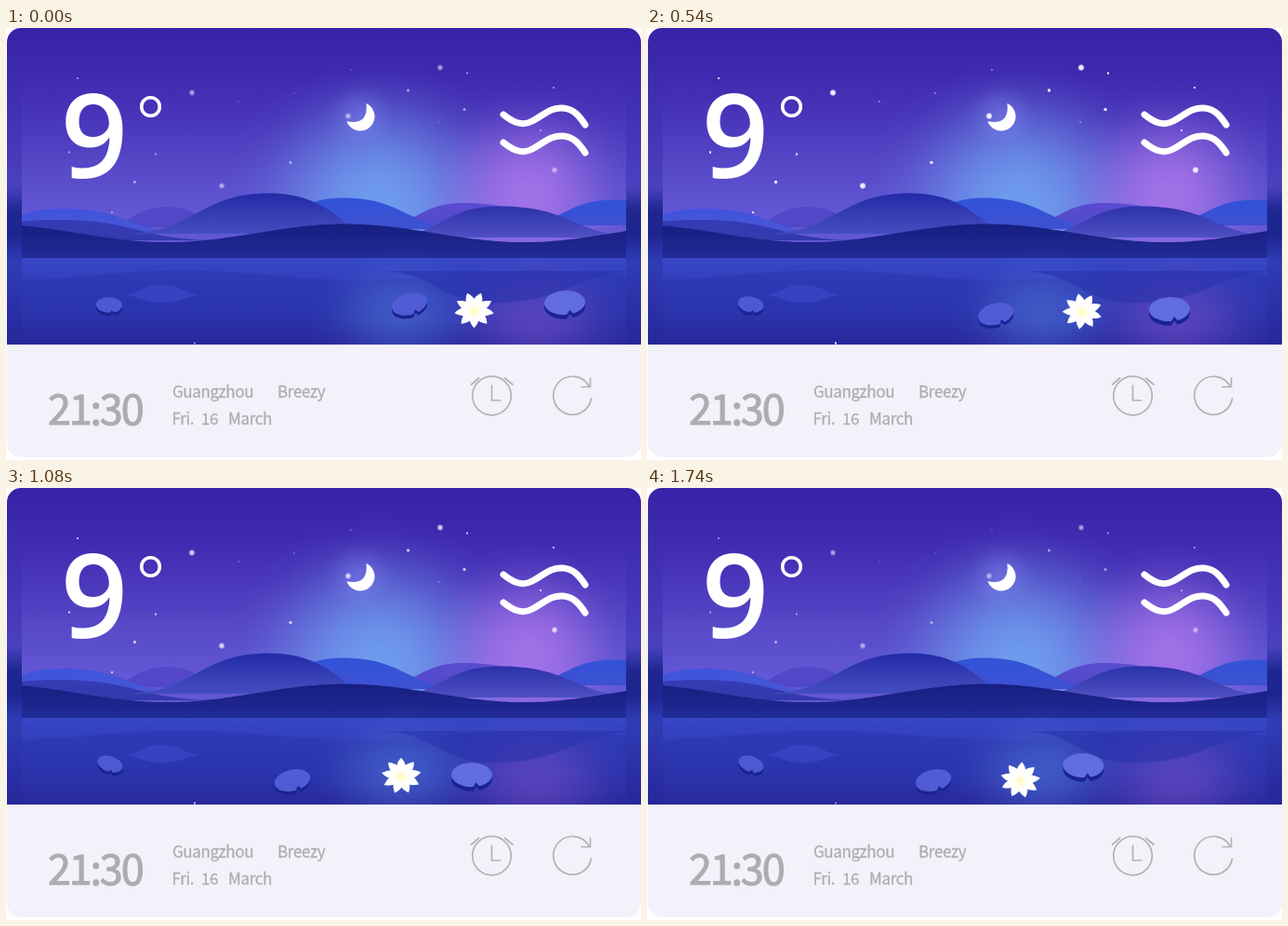
Write an HTML page with a canvas that moves like this. It is 683 by 464 pixels and loops after 1800 ms.

```html
<!DOCTYPE html>
<html lang="en">
<head>
<meta charset="utf-8">
<title>Night weather</title>
<style>
html, body { margin: 0; width: 100%; height: 100%; overflow: hidden; background: #fff; }
canvas, svg { position: absolute; left: 0; top: 0; width: 683px; height: 464px; display: block; }
.info { font-family: "Noto Sans CJK SC", "Noto Sans", sans-serif; fill: #adadb0; stroke: #adadb0; }
.small { font-size: 17px; letter-spacing: -.35px; stroke-width: .3; }
.time { font-size: 45px; letter-spacing: -2.2px; stroke-width: 1.1; }
.temp { font-family: "Open Sans", "Noto Sans", sans-serif; font-size: 126px; font-weight: 600; fill: #fff; }
.line { fill: none; stroke: #b3b3b5; stroke-width: 1.7; stroke-linecap: round; }
.white { fill: none; stroke: #fff; stroke-linecap: round; }
</style>
</head>
<body>
<canvas id="stage" width="683" height="464"></canvas>
<svg viewBox="0 0 683 464">
  <text class="temp" x="59" y="161">9</text>
  <circle class="white" cx="155.5" cy="84.5" r="9.8" stroke-width="3.6"/>
  <g class="white" stroke-width="7">
    <path id="breeze" d="M535 93C545 101 555 106 566 100C579 93 586 85 599 86C611 87 617 95 623 104"/>
    <use href="#breeze" y="30"/>
  </g>
  <g class="info">
    <text class="time" x="45" y="426">21:30</text>
    <g class="small">
      <text x="179" y="397">Guangzhou</text>
      <text x="292" y="397">Breezy</text>
      <text x="178.5" y="426">Fri.</text>
      <text x="210" y="426">16</text>
      <text x="239" y="426">March</text>
    </g>
  </g>
  <g class="line">
    <circle cx="522.5" cy="395" r="20.8"/>
    <path d="M522.5 384V400H531.5M500.500 383L508.500 376M536.500 376L545 383"/>
    <path d="M629.500 398A20.500 20.500 0 1 1 627 384.500M628.500 376V385.500H619"/>
  </g>
</svg>
<script>
const W = 683, H = 464, LOOP = 1800, SHORE = 247, FLOOR = 340;
const ctx = document.getElementById('stage').getContext('2d');
const rad = deg => deg * Math.PI / 180;
const mix = (a, b, k) => a + (b - a) * k;

function fade(c, y0, y1, ...colors) {
  const g = c.createLinearGradient(0, y0, 0, y1);
  colors.forEach((color, i) => g.addColorStop(i / (colors.length - 1), color));
  return g;
}

function glow(c, x, y, r, rgb, alpha, flat = 1) {
  c.save();
  c.translate(x, y);
  c.scale(1, flat);
  const g = c.createRadialGradient(0, 0, 0, 0, 0, r);
  for (let k = 0; k <= 1; k += .125) {
    g.addColorStop(k, `rgba(${rgb},${alpha * (1 + Math.cos(k * Math.PI)) / 2})`);
  }
  c.fillStyle = g;
  c.fillRect(-r, -r, 2 * r, 2 * r);
  c.restore();
}

// A hump over a flat foot; drop 0 ends in a soft tail, higher values make a steeper right side.
function hump(c, left, peakX, right, foot, peakY, fill, drop = 0) {
  const a = (peakX - left) / 2, b = (right - peakX) / 2;
  c.beginPath();
  c.moveTo(left, foot);
  c.bezierCurveTo(left + a, foot, peakX - a, peakY, peakX, peakY);
  c.bezierCurveTo(peakX + b, peakY, right - b * (1 - drop), mix(foot, peakY, drop), right, foot);
  c.fillStyle = fill;
  c.fill();
}

// Everything below a cosine wave.
function wave(c, mid, height, crest, half, bottom, fill) {
  c.beginPath();
  c.moveTo(0, bottom);
  for (let x = 0; x <= W; x += 4) c.lineTo(x, mid - height * Math.cos((x - crest) / half * Math.PI));
  c.lineTo(W, bottom);
  c.fillStyle = fill;
  c.fill();
}

function drawSky(c) {
  c.fillStyle = fade(c, 0, 200, '#3822a7', '#3f29af', '#4a37bb', '#5749c8', '#6257d4');
  c.fillRect(0, 0, W, SHORE);
  glow(c, 400, 192, 165, '112,162,240', .92);
  glow(c, 562, 178, 120, '176,120,236', .82);
  glow(c, 381, 95, 42, '150,150,255', .3);
}

function drawHills(c) {
  const shade = (top, a, b) => fade(c, top, 225, a, b);
  hump(c, 100, 172, 250, 214, 192, shade(192, '#5447ca', '#4e48c6'));
  hump(c, -60, 62, 200, 220, 194, shade(194, '#3d53dc', '#4d58d4'));
  hump(c, 390, 492, 640, 216, 188, shade(188, '#5a4bd0', '#4c4cc8'));
  hump(c, 250, 362, 500, 216, 182.5, shade(182, '#3153d9', '#4250d0'));
  hump(c, 545, 655, 790, 212, 184.5, shade(184, '#3152d8', '#4550cf'));
  hump(c, -120, 55, 230, 228, 206, shade(206, '#343cb6', '#3339ad'));
  hump(c, 125, 284, 378, 221, 177.5, shade(177, '#222ba6', '#4851c2'), .5);
  hump(c, 405, 532, 690, 225, 191.5, shade(191, '#2a32aa', '#4f50c2'));
  wave(c, 220.3, 9.8, 365, 192, SHORE, fade(c, 210, SHORE, '#171e80', '#212b96'));
}

function drawLake(c) {
  c.fillStyle = fade(c, SHORE, FLOOR, '#3747c7', '#303cb8', '#2b34ae', '#29289a');
  c.fillRect(0, SHORE, W, FLOOR - SHORE);
  wave(c, 265.5, 5, 190, 190, FLOOR, fade(c, 260, FLOOR, 'rgba(34,40,158,.3)', 'rgba(34,40,158,0)'));
  hump(c, 122, 168, 214, 287, 276, 'rgba(64,78,212,.5)');
  hump(c, 122, 168, 214, 287, 295, 'rgba(64,78,212,.5)');
  glow(c, 425, 306, 105, '82,122,218', .52, .7);
  glow(c, 570, 312, 112, '130,84,206', .5, .7);
  hump(c, 400, 525, 690, 261, 295, 'rgba(43,50,172,.6)');
}

function drawMoon(c) {
  c.fillStyle = '#fff';
  c.beginPath();
  c.arc(381, 95, 15.5, rad(-65), rad(160));
  c.quadraticCurveTo(390, 105, 387.5, 81);
  c.fill();
}

function buildBackground() {
  const cv = document.createElement('canvas'), c = cv.getContext('2d');
  cv.width = W;
  cv.height = H;
  c.fillStyle = '#fff';
  c.fillRect(0, 0, W, H);
  c.beginPath();
  c.roundRect(1, 0, 682, 461, 15);
  c.clip();
  // Blurred margins behind the scene.
  c.fillStyle = fade(c, 0, 170, '#3822a7', '#4230b2', '#4a41c0');
  c.fillRect(0, 0, W, 170);
  c.fillStyle = fade(c, 170, 250, '#4a41c0', '#1e2790', '#1d2690', '#303cb6');
  c.fillRect(0, 170, W, 80);
  c.fillStyle = fade(c, 250, FLOOR, '#303cb6', '#27279a');
  c.fillRect(0, 250, W, 90);
  c.save();
  c.beginPath();
  c.rect(17, 0, 650, FLOOR);
  c.clip();
  [drawSky, drawHills, drawLake, drawMoon].forEach(paint => paint(c));
  c.restore();
  c.fillStyle = '#f3f2fb';
  c.fillRect(0, FLOOR, W, 121);
  return cv;
}

// Star places by radius.
const stars = {
  3: [[200, 69.5], [467, 42.5], [590, 152.5], [232, 169.5], [368, 94.5]],
  1.7: [[432.5, 67], [306, 144.5], [138.5, 165.5], [493, 87.5]],
  1.2: [[77, 54], [496, 48.5], [589, 64], [575, 110], [161, 135.5], [68, 133.5], [114, 198], [203, 338.5]],
  .7: [[371, 45], [310, 70], [250, 79], [466, 101]]
};

// Short flashes every 480 ms after a calm start.
function twinkle(t) {
  const away = Math.abs((t + 180) % 480 - 240);
  return t < 300 ? 0 : Math.max(0, 1 - away / 130);
}

function drawStars(t) {
  const shine = twinkle(t), a = mix(.64, 1, shine);
  for (const size in stars) {
    const r = size * 1.25;
    for (const [x, y] of stars[size]) {
      const g = ctx.createRadialGradient(x, y, 0, x, y, r);
      g.addColorStop(0, `rgba(255,255,255,${a})`);
      g.addColorStop(mix(.4, .65, shine), `rgba(240,236,255,${a * .85})`);
      g.addColorStop(1, 'rgba(230,225,255,0)');
      ctx.fillStyle = g;
      ctx.fillRect(x - r, y - r, 2 * r, 2 * r);
    }
  }
}

// x, y and turn at both ends; ease shapes the speed, arc bends the path.
const drifts = {
  small: { from: [111, 297.5, 2], to: [112, 296.5, 19], end: 1080, ease: 1, arc: 1 },
  middle: { from: [434, 296.5, -15], to: [308, 314, -13], end: 1080, ease: 1.1, arc: .65 },
  large: { from: [601, 295, -3], to: [444.5, 312.5, 2], end: 1500, ease: 1.36, arc: .65, back: [31, -18] },
  flower: { from: [503.5, 303, 0], to: [401.5, 313.5, 25], end: 1360, ease: 1.15, arc: 2 }
};

function place({ from, to, end, ease, arc, back = [0, 0] }, t) {
  const p = Math.min(1, t / end) ** ease;
  const q = Math.max(0, t - end) / (LOOP - end);
  return [
    mix(from[0], to[0], p) + back[0] * q,
    mix(from[1], to[1], p ** arc) + back[1] * q,
    rad(mix(from[2], to[2], p))
  ];
}

function leaf(x, y, turn, rx, ry, color) {
  ctx.save();
  ctx.translate(x, y);
  ctx.rotate(turn);
  ctx.scale(rx, ry);
  ctx.beginPath();
  ctx.arc(0, 0, 1, rad(86), rad(428));
  ctx.lineTo(.22, .62);
  ctx.lineTo(.16, .78);
  ctx.closePath();
  ctx.restore();
  ctx.fillStyle = color;
  ctx.fill();
}

function pad(drift, t, rx, ry, drop, color) {
  const [x, y, turn] = place(drift, t);
  leaf(x, y + drop, turn, rx, ry, '#1a238f');
  leaf(x, y, turn, rx, ry, color);
}

function flower(t) {
  const [x, y, turn] = place(drifts.flower, t), petals = 9;
  ctx.save();
  ctx.translate(x, y);
  ctx.scale(1, .9);
  ctx.rotate(turn + rad(10));
  ctx.fillStyle = '#fff';
  for (let i = 0; i < petals; i++) {
    ctx.beginPath();
    ctx.moveTo(0, 0);
    ctx.bezierCurveTo(5, -7, 14, -6.5, 21.5, 0);
    ctx.bezierCurveTo(14, 6.5, 5, 7, 0, 0);
    ctx.fill();
    ctx.rotate(2 * Math.PI / petals);
  }
  ctx.restore();
  glow(ctx, x, y + 1, 9, '255,250,170', .75);
}

const background = buildBackground();

function draw(now) {
  const t = now % LOOP;
  ctx.drawImage(background, 0, 0);
  drawStars(t);
  pad(drifts.small, t, 14, 8.5, 3.5, '#4c59d2');
  pad(drifts.middle, t, 19.5, 11.5, 3.5, '#505bd6');
  pad(drifts.large, t, 22, 13, 4.5, '#606ce0');
  flower(t);
}

let start = null;
function tick(now) {
  if (start === null) start = now;
  draw(now - start);
  requestAnimationFrame(tick);
}
draw(0);
requestAnimationFrame(tick);
</script>
</body>
</html>
```
